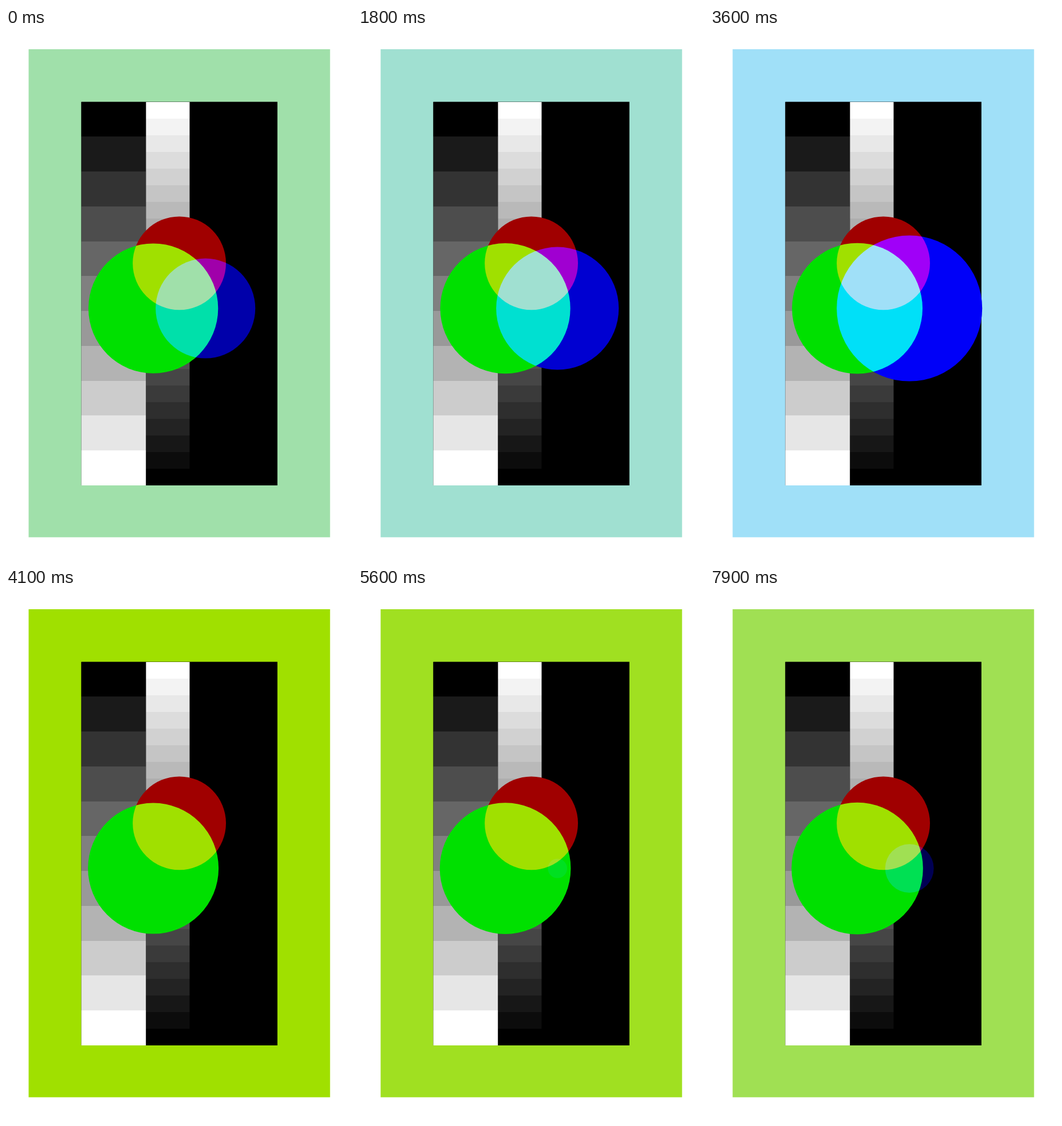
An HTML page with a canvas that plays this animation: 604x927 px, repeating every 8000 ms.

```html
<!DOCTYPE html>
<html lang="en">
<head>
<meta charset="utf-8">
<title>Additive colour mixing</title>
<style>
html, body { margin: 0; width: 100%; height: 100%; overflow: hidden; background: #fff; }
canvas { display: block; }
</style>
</head>
<body>
<canvas id="stage" width="604" height="927"></canvas>
<script>
const ctx = document.getElementById('stage').getContext('2d');
const LOOP = 8000, STEP = 100, RESET = 4100;
const GROWTH = 1 / 90; // blue radius, px per ms
const TOP = 128.6, HEIGHT = 668.4;

function rect(x, y, w, h, color) {
  ctx.fillStyle = color;
  ctx.fillRect(x, y, w, h);
}

function disc({ x, y, r }, color) {
  ctx.fillStyle = color;
  ctx.beginPath();
  ctx.arc(x, y, r, 0, 2 * Math.PI);
  ctx.fill();
}

// A column of equal grey steps, from black to white or reversed.
function greyScale(x, w, count, reversed) {
  const edge = i => Math.round(TOP + HEIGHT * i / count);
  for (let i = 0; i < count; i++) {
    const k = i / (count - 1);
    const v = Math.round(255 * (reversed ? 1 - k : k));
    rect(x, edge(i), w, edge(i + 1) - edge(i), `rgb(${v},${v},${v})`);
  }
}

function draw(t) {
  const blueR = t < RESET ? 87 + t * GROWTH : 0.2 + (t - RESET) * GROWTH;
  const level = Math.min(255, Math.round(blueR * 1.95));
  const discs = [
    { x: 302.6, y: 409.8, r: 81.4, color: 'rgb(160,0,0)' },
    { x: 257.1, y: 488.6, r: 113.2 + t * 0.0002, color: 'rgb(0,224,0)' },
    { x: 348.2, y: 488.6, r: blueR, color: `rgb(0,0,${level})` }
  ];

  rect(0, 0, 604, 927, '#fff');
  rect(39.5, 37, 526.2, 850.4, `rgb(160,224,${level})`);
  rect(131.5, TOP, 342.3, HEIGHT, '#000');
  greyScale(131.5, 113, 11, false);
  greyScale(244.4, 76.1, 23, true);

  // Cover the greys, then add the lights together.
  discs.forEach(d => disc(d, '#000'));
  ctx.globalCompositeOperation = 'lighter';
  discs.forEach(d => disc(d, d.color));
  ctx.globalCompositeOperation = 'source-over';
}

const start = performance.now();
function tick() {
  const t = (performance.now() - start) % LOOP;
  draw(Math.floor(t / STEP) * STEP);
  requestAnimationFrame(tick);
}
tick();
</script>
</body>
</html>
```
